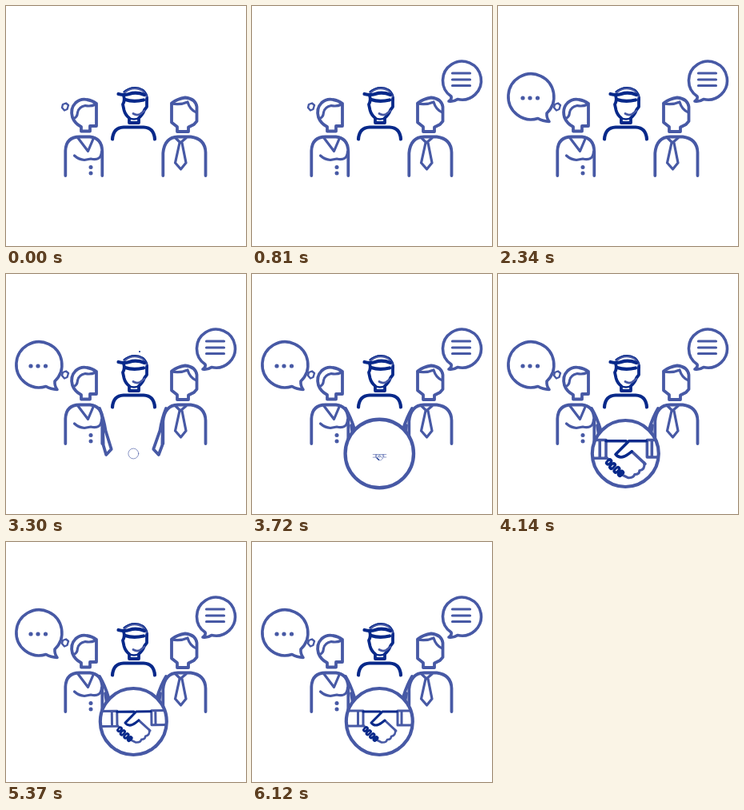
Write an HTML page that moves like this. It is 300 px wide and 300 px high and loops after 8.7 s.

```html
<!DOCTYPE html>
<html lang="en">
<head>
<meta charset="utf-8">
<title>Team agreement</title>
<style>
html, body { margin: 0; width: 100%; height: 100%; overflow: hidden; background: #fff; }
svg { display: block; width: 100vw; height: 100vh; }
.line { fill: none; stroke: #4759a5; stroke-width: 3.8; stroke-linecap: round; stroke-linejoin: round; }
.fine { stroke-width: 3.2; }
.dark { stroke: #08298a; }
.dot { fill: #4759a5; stroke: none; }
.white { fill: #fff; }
</style>
</head>
<body>
<svg viewBox="0 0 300 300">
  <g class="line">
    <!-- woman -->
    <path d="M71 123 L75 121.5 L78 124 L76.5 129 L73 130.5 L70 127 Z" stroke-width="2.4"/>
    <path d="M113 122 V150 H105 V156.500 H94 V151 Q86 147 83 139 Q80 128 87 121 Q93 115.500 101 117 Q108 118 113 122"/>
    <path class="fine" d="M112 123 Q106 126 99 124.500 Q91 126 89.500 133 Q89 140 84 140.500"/>
    <path d="M74.300 212 V181 Q75 163.500 92 163.500 H105 Q120 165 120.300 182 V212"/>
    <path class="fine" d="M90 165 L102.500 181.500 L109.500 165"/>
    <path class="fine" d="M85.500 187 Q91 192 98 192.500 L106 191 Q119 194 119.500 182"/>
    <g class="dot"><circle cx="106" cy="201.500" r="2.500"/><circle cx="106" cy="209" r="2.500"/></g>

    <!-- agent -->
    <g class="dark">
      <path d="M148 108 Q156 101 166 103.500 Q176 106 176.500 117" stroke="#4759a5" stroke-width="3"/>
      <path d="M147 107 Q155 100 166 102 Q176 105 177.500 115" stroke-width="1.200"/>
      <path d="M140.500 110 Q148 112 154 110 Q163 107 173 111" stroke-width="4.200"/>
      <path d="M149 117 Q159 120.500 172 117.500" stroke-width="4.200"/>
      <path d="M147 112 Q149 118 146 123 L147.500 130 Q149 136 154 140 V146 H166 V140 Q171 136 173 130 L176 126 V116"/>
      <path d="M154 140 Q160 143 166 140" stroke-width="2.500"/>
      <path d="M159 134.500 Q163 137 167 135.500 L173 131" stroke="#4759a5" stroke-width="2.800"/>
      <path d="M133 166.500 Q134 152 147 151.500 H172 Q185 152 186 166.500" stroke-width="4.200"/>
    </g>

    <!-- man -->
    <path d="M207 121.500 Q214 116 224 114.500 Q237 116 238.500 126 V144 L235 148 L228 151.500 V157 H214 V151 L207 145.500 Z"/>
    <path class="fine" d="M207 122 Q218 124 227 120 Q230 130 238 133"/>
    <path d="M196.300 212 V184 Q198 164 215 163.500 H231 Q249 166 249.500 183 V212"/>
    <path class="fine" d="M212 165 L218 171 L225 165 M217 171 L211.500 196 L218.500 204 L225 196 L220 171"/>

    <!-- arms -->
    <path id="armL" pathLength="100" d="M117 168 Q122 180 124.500 196 L131.500 219 L125 226 L121.500 214 L121 190"/>
    <path id="armR" pathLength="100" d="M200 168 Q195 180 192.500 196 L184.500 219 L191 226 L195.500 214 L196 190"/>
    <circle id="spark" cx="167" cy="97" r="1" fill="#08298a" stroke="none"/>

    <!-- bubbles -->
    <g id="reply">
      <path d="M257 116.500 Q252 120 246 119 Q250 116.500 249 113 A24 24 0 1 1 257 116.500Z" stroke-width="3.600"/>
      <path class="fine" d="M250.500 84 H272.500 M250.500 92 H272.500 M250.500 99.500 H272.500"/>
    </g>
    <g id="thought">
      <path d="M50 140.500 Q56 144 64 144.500 Q60.500 140 61 134 A28.500 28.500 0 1 0 50 140.500Z" stroke-width="3.600"/>
      <g class="dot"><circle cx="31" cy="115" r="2.600"/><circle cx="40" cy="115" r="2.600"/><circle cx="49.500" cy="115" r="2.600"/></g>
    </g>

    <!-- handshake badge -->
    <g id="badge"><circle class="white" cx="159.300" cy="224.500" r="41.500" stroke-width="4.200"/></g>
    <clipPath id="hole"><circle cx="159.300" cy="224.500" r="41"/></clipPath>
    <g clip-path="url(#hole)">
      <g id="hands" stroke-width="3">
        <path d="M116 211 H139 V230 H116 M132.500 212 V229 M203 211 H182 V229 H203 M187 212 V228"/>
        <path d="M139 229 L143 233 M166 223 L180 236"/>
        <path class="dark" d="M139 212 H160 M181 212 H163 L149 226 Q154 232 162 226 L166 223"/>
        <path d="M155 247 L162 250.500 Q168 251 169 247 Q174 247 174 243 Q180 242 179 235" stroke-width="2.600"/>
        <path class="dark" d="M143 233 l-2 2 M147 237 l-2.500 2.500 M151.500 241 l-2.500 2.500 M155.500 245 l-2 2" stroke-width="5.800"/>
        <path d="M142.500 233.500 l-1 1 M146.500 237.500 l-1.500 1.500 M151 241.500 l-1.500 1.500" stroke="#fff" stroke-width="1"/>
      </g>
    </g>
  </g>
</svg>
<script>
const LOOP = 8700;
const get = id => document.getElementById(id);
const part = (t, a, b) => Math.min(1, Math.max(0, (t - a) / (b - a)));
const smooth = p => p * p * (3 - 2 * p);

// grows past full size, then settles
function pop(t, start, peak, end, over) {
  return t < peak ? over * smooth(part(t, start, peak))
                  : over + (1 - over) * smooth(part(t, peak, end));
}

function place(id, x, y, scale, turn = 0) {
  const el = get(id);
  el.style.display = scale > 0.01 ? '' : 'none';
  el.setAttribute('transform',
    `translate(${x} ${y}) rotate(${turn}) scale(${scale}) translate(${-x} ${-y})`);
}

// draws an arm out from the shoulder, then swings it inwards
function reach(id, x, t, side) {
  const shown = smooth(part(t, 2730, 3240));
  place(id, x, 168, shown > 0 ? 1 : 0, side * 8 * smooth(part(t, 3270, 3600)));
  get(id).setAttribute('stroke-dasharray', `${shown * 100} 200`);
}

function draw(t) {
  place('reply', 262, 92, pop(t, 30, 510, 780, 1.06));
  place('thought', 41, 114, pop(t, 930, 1290, 1500, 1.05));

  reach('armL', 117, t, -1);
  reach('armR', 200, t, 1);
  get('spark').style.display = t >= 3210 && t < 3420 ? '' : 'none';

  place('badge', 159.3, 224.5, pop(t, 3175, 3690, 4050, 1.03));
  const shake = part(t, 4530, 6120);
  const turn = 3 * Math.sin(shake * Math.PI * 6) * (1 - shake);
  place('hands', 159.5, 229, pop(t, 3600, 4080, 4680, 1.2), turn);
}

function tick(now) {
  draw(now % LOOP);
  requestAnimationFrame(tick);
}
draw(0);
requestAnimationFrame(tick);
</script>
</body>
</html>
```
